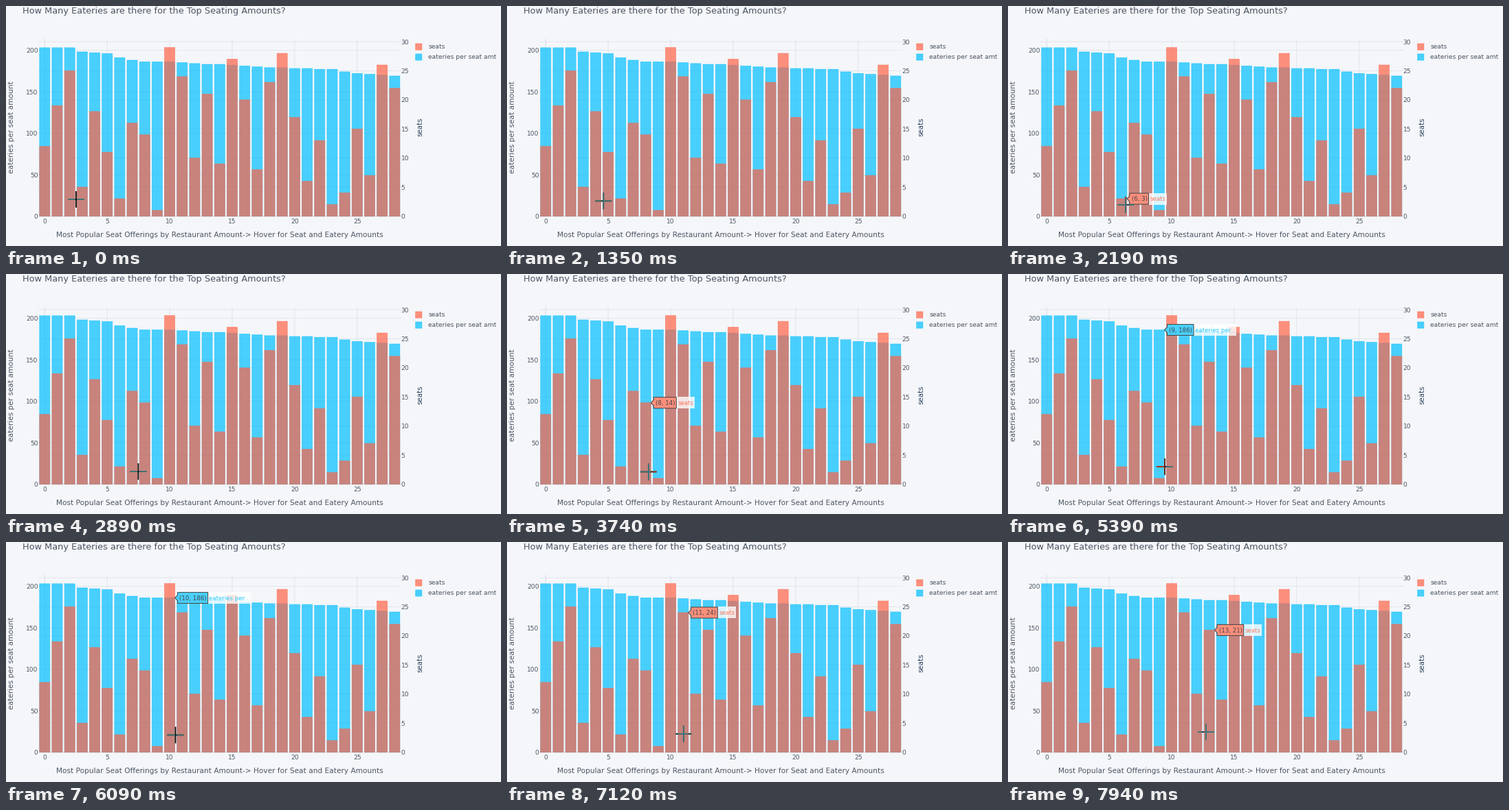
Animation of 720 by 350 pixels, one loop 8000 ms. Source, as a matplotlib script:

```python
import matplotlib.pyplot as plt
import numpy as np
from matplotlib.animation import FuncAnimation
from matplotlib.collections import PatchCollection
from matplotlib.patches import Polygon, Rectangle
from matplotlib.path import Path
from matplotlib.textpath import TextPath

W, H, DPI = 720, 350, 100
STEP_MS, LOOP_MS = 40, 8000
PT = 72 / DPI  # points per pixel

BG = np.array([244, 246, 249]) / 255
GRID = "#E1E5ED"
INK = "#4D5663"
BLUE = np.array([0, 191, 255]) / 255
RED = np.array([255, 99, 71]) / 255
FILL, EDGE = 0.7, 0.6

# the charted data: eateries fall off piecewise, seats are the ranks themselves
EATERIES = np.interp(range(29), [0, 2, 3, 5, 6, 8, 10, 14, 17, 23, 24, 28],
                     [203, 203, 198, 196, 191, 186, 186, 183, 180, 177, 174, 169]).astype(int)
SEATS = [12, 19, 25, 5, 18, 11, 3, 16, 14, 1, 29, 24, 10, 21, 9,
         27, 20, 8, 23, 28, 17, 6, 13, 2, 4, 15, 7, 26, 22]

LEFT, RIGHT, TOP, BASE = 47, 575, 48, 306.5
X0, DX, HALF = 56.3, 18.18, 7.5
EAT_PX, SEAT_PX = 1.21, 8.48
TIP_SIZE = 8.6

# pointer bursts: start ms, end ms, resting place; it is redrawn about every TICK ms
TICK = 145
START = (102, 282)
BURSTS = [
    (160, 910, (138.5, 284)),
    (1350, 2190, (171, 290)),
    (2610, 3180, (204, 287)),
    (3740, 4250, (222, 301)),
    (4530, 4650, (223, 290)),
    (4800, 4950, (234, 282)),
    (5100, 5100, (226.5, 281)),
    (5390, 6090, (246.5, 281.5)),
    (6220, 6350, (255, 280)),
    (7120, 7940, (288, 277)),
]

plt.rcParams["font.family"] = "DejaVu Sans"
fig = plt.figure(figsize=(W / DPI, H / DPI), dpi=DPI, facecolor=BG)
ax = fig.add_axes([0, 0, 1, 1])
ax.set_xlim(0, W)
ax.set_ylim(H, 0)
ax.axis("off")


def bar_x(i):
    return X0 + DX * i


def label(x, y, s, size, color=INK, **kw):
    return ax.text(x, y, s, fontsize=size * PT, color=color, **kw)


def rule(xs, ys, width=1.0):
    ax.plot(xs, ys, color=GRID, lw=width * PT, zorder=1, solid_capstyle="butt", snap=False)


def text_width(s):
    return TextPath((0, 0), s, size=TIP_SIZE).get_extents().width


def add_rects(rects, face, edge, z):
    group = PatchCollection(rects, facecolors=[face], edgecolors=[edge],
                            linewidths=[0.8 * PT], zorder=z, snap=False)
    ax.add_collection(group, autolim=False)
    return group


def add_bars(values, scale, rgb, z):
    rects = [Rectangle((bar_x(i) - HALF, BASE - v * scale), 2 * HALF, v * scale)
             for i, v in enumerate(values)]
    return add_rects(rects, (*rgb, FILL), (*rgb, EDGE), z)


def draw_chart():
    for i in range(0, 26, 5):
        x = bar_x(i)
        rule([x, x], [TOP, BASE], 1 if i else 1.6)
        label(x, 317.3, str(i), 9.1, ha="center")
    for step, stop, scale, x, side in ((50, 201, EAT_PX, 46.5, "right"),
                                       (5, 31, SEAT_PX, 574.6, "left")):
        for v in range(0, stop, step):
            y = BASE - v * scale
            rule([LEFT, RIGHT], [y, y], 1 if v else 1.6)
            label(x, y + 3.6, str(v), 9.1, ha=side)

    add_bars(EATERIES, EAT_PX, BLUE, 2)
    add_bars(SEATS, SEAT_PX, RED, 3)

    label(24, 11, "How Many Eateries are there for the Top Seating Amounts?", 12.9)
    label(310.5, 337, "Most Popular Seat Offerings by Restaurant Amount-> "
          "Hover for Seat and Eatery Amounts", 10.47, ha="center")
    upright = dict(rotation=90, ha="center", va="center")
    label(8, 176.5, "eateries per seat amount", 10.45, **upright)
    label(602, 176.5, "seats", 10.3, "#2A3F5F", **upright)

    # the legend panel hides part of the topmost tick label
    ax.add_patch(Rectangle((584.7, TOP), W - 584.7, 37, fc=BG, ec="none", zorder=4))
    for y, rgb, name in ((59, RED, "seats"), (74, BLUE, "eateries per seat amt")):
        add_rects([Rectangle((595.2, y - 4.6), 9.2, 9.2)], (*rgb, FILL), (*rgb, EDGE), 5)
        label(614.5, y + 3.2, name, 9.2, zorder=5)


draw_chart()

# hover label
tip_box = ax.add_patch(Polygon([(0, 0), (1, 0), (1, 1)], ec="#444444", lw=PT, zorder=8))
tip_name_box = ax.add_patch(Rectangle((0, 0), 1, 1, fc=(1, 1, 1, 0.8), ec="none", zorder=7))
tip_text = label(0, 0, "", TIP_SIZE, "#444444", zorder=9)
tip_name = label(0, 0, "", TIP_SIZE, zorder=9)
tip_parts = [tip_box, tip_name_box, tip_text, tip_name]

# an inverted copy of the chart, seen only through the crosshair
crosshair = [
    add_rects([Rectangle((0, 0), W, H)], (*(1 - BG), 1), "none", 20),
    add_bars(EATERIES, EAT_PX, 1 - BLUE, 21),
    add_bars(SEATS, SEAT_PX, 1 - RED, 22),
]


def cross_path(x, y, arm=12, w=0.9):
    pts = [(-w, -arm), (w, -arm), (w, -w), (arm, -w), (arm, w), (w, w),
           (w, arm), (-w, arm), (-w, w), (-arm, w), (-arm, -w), (-w, -w), (-w, -arm)]
    return Path(np.array(pts) + (x, y), closed=True)


def pointer(t):
    """Eased travel between resting places, in visible jumps."""
    pos = np.array(START, float)
    for start, end, goal in BURSTS:
        if t < start:
            break
        jumps = round((end - start) / TICK) + 1
        gap = (end - start) / max(jumps - 1, 1) or TICK
        u = min(1 + int((t - start) / gap), jumps) / jumps
        pos = pos + (np.array(goal) - pos) * u * u * (3 - 2 * u)
    return pos


def hit(x, y):
    """Shortest bar below the pointer, as (index, value, top, colour, name)."""
    x -= 1
    i = int(round((x - X0) / DX))
    if abs(x - bar_x(i)) > HALF:
        return None
    options = [(i, SEATS[i], BASE - SEATS[i] * SEAT_PX, RED, "seats"),
               (i, EATERIES[i], BASE - EATERIES[i] * EAT_PX, BLUE, "eateries per...")]
    inside = [o for o in options if o[2] <= y]
    return max(inside, key=lambda o: o[2]) if inside else None


def show_tip(found):
    for part in tip_parts:
        part.set_visible(found is not None)
    if found is None:
        return
    i, value, y, rgb, name = found
    text = f"({i}, {value})"
    x = bar_x(i) + HALF
    left = x + 4
    right = left + text_width(text) + 6
    tip_box.set_xy([(x, y), (left, y - 4), (left, y - 8), (right, y - 8),
                    (right, y + 8), (left, y + 8), (left, y + 4)])
    tip_box.set_facecolor(FILL * rgb + (1 - FILL) * BG)
    tip_name_box.set_bounds(right, y - 8.5, text_width(name) + 4.5, 17)
    tip_text.set_text(text)
    tip_text.set_position((left + 2.7, y + 3.2))
    tip_name.set_text(name)
    tip_name.set_position((right + 1.8, y + 3.2))
    tip_name.set_color((*rgb, 0.85))


def draw(k):
    x, y = pointer(k * STEP_MS + 35)
    show_tip(hit(x, y))
    clip = cross_path(x, y)
    for layer in crosshair:
        layer.set_clip_path(clip, ax.transData)
    return tip_parts + crosshair


anim = FuncAnimation(fig, draw, frames=LOOP_MS // STEP_MS, interval=STEP_MS,
                     repeat=True, repeat_delay=0, blit=False)
plt.show()
```
